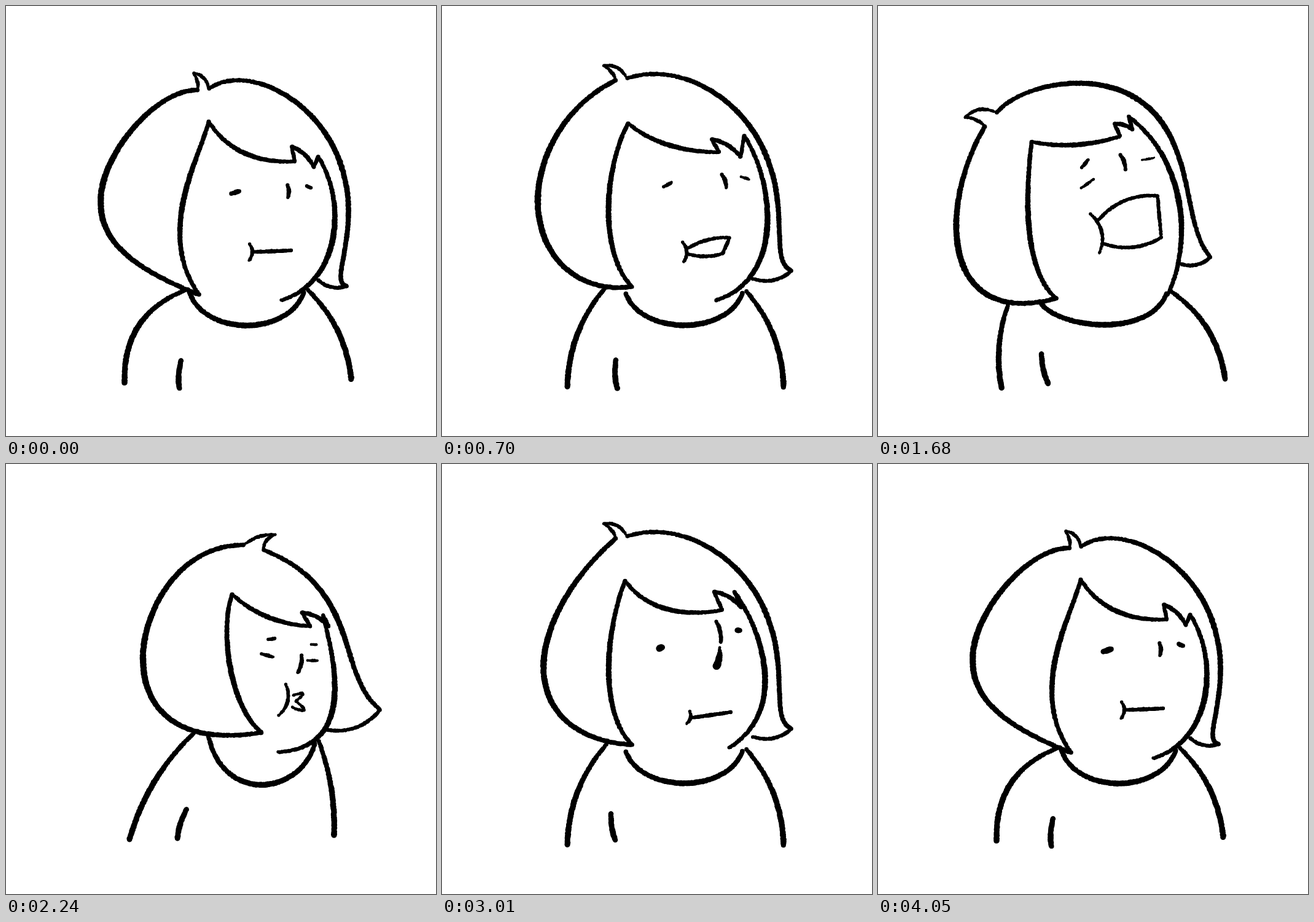
Write an HTML page with a canvas that moves like this. It is 700x700 px and loops after 4150 ms.

```html
<!DOCTYPE html>
<html>
<head>
<meta charset="utf-8">
<style>
html, body { margin: 0; width: 100%; height: 100%; overflow: hidden; background: #fff; }
canvas { display: block; width: 100vmin; height: 100vmin; }
</style>
</head>
<body>
<canvas id="stage" width="700" height="700"></canvas>
<script>
const ctx = document.getElementById('stage').getContext('2d');

// Each pose holds only the key points of the drawing; curves follow from them.
// body: shoulder, both collar ends, both hands, then the bend of each arm.
const calm = {
  tuft: [312,137, 305,109, 330,135],
  back: [216,189, 157,293, 182,391],
  front: [455,145, 545,258, 553,388, 555,456],
  nape: [508,446],
  side: [303,266, 283,365, 314,470],
  bang: [330,188, 387,239, 470,253, 465,229, 501,262, 508,245],
  jaw: [535,332, 517,422, 448,479],
  eyes: [366,306, 380,301, 489,293, 496,296],
  nose: [458,291, 459,312],
  lip: [396,387, 396,414],
  lips: [464,398, 464,398],
  body: [296,461, 298,465, 485,466, 193,614, 562,607, -0.18, 0.09],
  crease: [285,577, 282,622],
  eyeWidth: [8]
};

const talk = {
  tuft: [283,121, 263,97, 301,118],
  back: [193,200, 156,315, 194,420],
  front: [438,138, 527,242, 549,360, 569,431],
  nape: [506,444],
  side: [276,275, 274,375, 309,457],
  bang: [303,191, 368,226, 451,238, 439,217, 486,246, 492,211],
  jaw: [527,308, 518,412, 446,479],
  eyes: [360,295, 374,287, 486,278, 500,282],
  nose: [455,274, 463,296],
  lip: [391,384, 394,416],
  lips: [468,377, 457,403],
  body: [268,456, 299,468, 489,468, 204,620, 556,620, -0.09, 0.09],
  crease: [283,576, 285,622],
  eyeWidth: [6]
};

const grit = {
  tuft: [374,126, 382,96, 397,130],
  back: [260,182, 210,299, 239,418],
  front: [511,179, 574,286, 574,398, 582,472],
  nape: [513,457],
  side: [346,290, 337,390, 348,481],
  bang: [372,211, 427,263, 498,283, 496,263, 522,287, 527,272],
  jaw: [547,372, 500,461, 400,479],
  eyes: [418,311, 437,313, 516,326, 529,329],
  nose: [497,313, 493,333],
  lip: [414,391, 399,414],
  lips: [478,412, 468,420],
  body: [292,461, 304,470, 489,472, 190,618, 557,615, -0.17, 0.15],
  crease: [284,585, 282,618],
  eyeWidth: [6],
  marks: 'teeth fold'
};

const shout = {
  tuft: [174,196, 142,181, 193,174],
  back: [135,294, 131,397, 178,470],
  front: [313,126, 440,165, 500,283, 541,409],
  nape: [493,420],
  side: [244,305, 252,402, 290,476],
  bang: [250,221, 322,226, 394,212, 385,192, 414,201, 408,180],
  jaw: [473,263, 494,367, 472,470],
  eyes: [330,297, 351,282, 429,251, 450,247],
  brows: [331,264, 342,250],
  nose: [394,242, 403,266],
  lip: [345,338, 360,403],
  lips: [455,309, 461,377],
  body: [213,483, 263,481, 470,468, 201,621, 565,607, -0.07, 0.11],
  crease: [266,566, 277,615],
  eyeWidth: [5]
};

const pout = {
  tuft: [387,132, 439,115, 419,140],
  back: [267,193, 223,315, 268,416],
  front: [490,182, 538,249, 566,329, 609,400],
  nape: [523,433],
  side: [360,290, 377,376, 416,437],
  bang: [368,212, 426,249, 495,264, 482,242, 525,264, 516,246],
  jaw: [534,338, 522,426, 443,469],
  eyes: [415,309, 435,314, 490,320, 507,320],
  brows: [426,286, 438,284, 496,294, 506,294],
  nose: [481,311, 475,340],
  lip: [455,358, 444,409],
  kiss: [467,377, 472,386, 466,396],
  body: [309,435, 329,441, 503,455, 201,611, 534,604, -0.07, 0.05],
  crease: [294,562, 279,609],
  eyeWidth: [6]
};

const sniff = {
  ...talk,
  back: [207,208, 166,316, 195,411],
  bang: [298,190, 362,235, 456,238, 443,208, 487,234, 476,208],
  jaw: [517,293, 522,387, 467,462],
  eyes: [353,301, 358,298, 480,271, 485,271],
  nose: [446,256, 454,290],
  lip: [403,402, 398,423],
  lips: [470,404, 470,404],
  crease: [275,569, 282,612],
  eyeWidth: [12],
  marks: 'drip'
};

const still = ['body', 'crease', 'eyeWidth', 'marks'];

// The same pose with the head shifted.
function shift(pose, dx, dy, changes) {
  const moved = {};
  for (const k in pose) {
    moved[k] = still.includes(k) ? pose[k] : pose[k].map((v, i) => v + (i % 2 ? dy : dx));
  }
  return { ...moved, ...changes };
}

// Hair swings outward, more so the lower it hangs.
function spread(pose, amount) {
  const swing = p => p.map((x, i) =>
    i % 2 ? x : x + amount * (x - 300) * (p[i + 1] - 100) / 360);
  return { ...pose, back: swing(pose.back), front: swing(pose.front), eyeWidth: [5] };
}

const flare = spread(shift(calm, 0, -8), 0.36);
const rest = shift(sniff, -3, 2, { marks: '' });
const keys = [
  [0, calm], [420, flare], [490, flare], [700, talk], [1050, shift(talk, -8, -5)],
  [1330, grit], [1680, shout], [1820, shift(shout, -12, 6)], [2240, pout],
  [2590, shift(sniff, -7, -3, { marks: '' })], [3010, sniff], [3150, rest], [3360, rest],
  [3640, calm], [3710, calm], [3850, shift(calm, -1, -1, { eyeWidth: [5] })],
  [4050, { ...calm, eyeWidth: [10] }]
];

const mix = (a, b, u) => a + (b - a) * u;
const rand = n => { const v = Math.sin(n * 12.9898) * 43758.5453; return v - Math.floor(v); };
const pairs = p => Array.from({ length: p.length >> 1 }, (_, i) => p.slice(2 * i, 2 * i + 2));
const dist = (a, b) => Math.hypot(b[0] - a[0], b[1] - a[1]);

// Point on the smooth curve that passes through all given points.
function along(p, u) {
  const n = p.length / 2, s = u * (n - 1), out = [0, 0];
  for (let i = 0; i < n; i++) {
    let weight = 1;
    for (let j = 0; j < n; j++) if (j !== i) weight *= (s - j) / (i - j);
    out[0] += weight * p[2 * i];
    out[1] += weight * p[2 * i + 1];
  }
  return out;
}

// Arc from a to b, pushed sideways by a share of its length.
function bend(a, b, k) {
  const dx = b[0] - a[0], dy = b[1] - a[1];
  return [...a, a[0] + dx / 2 + k * dy, a[1] + dy / 2 - k * dx, ...b];
}

// Brush stroke with tapering ends and an uneven edge.
function ink(p, width, start = 0.7, end = start) {
  let length = 0;
  const pts = pairs(p);
  for (let i = 1; i < pts.length; i++) length += dist(pts[i - 1], pts[i]);
  const steps = Math.ceil(length * 1.1) + 1;
  ctx.beginPath();
  for (let i = 0; i <= steps; i++) {
    const u = i / steps, [x, y] = along(p, u);
    const w = u < 0.5 ? mix(start, 1, 2 * u) : mix(1, end, 2 * u - 1);
    const r = width * w / 2 + 0.9 * (rand(i) - 0.6);
    const cx = x + rand(i + 500) - 0.5, cy = y + rand(i + 900) - 0.5;
    ctx.moveTo(cx + r, cy);
    ctx.arc(cx, cy, r, 0, 7);
  }
  ctx.fill();
}

function drawHair(pose) {
  const [left, tip, right] = pairs(pose.tuft);
  const lean = tip[0] > right[0] ? -1 : 1;
  ink(bend(left, tip, -0.1 * lean), 6);
  ink(bend(tip, right, 0.18 * lean), 6);

  const chin = pose.side.slice(-2);
  ink([...left, ...pose.back, ...chin], 10);
  ink([...right, ...pose.front], 9);
  ink(bend(pose.front.slice(-2), pose.nape, 0.14), 6, 1);

  const [part, mid, end, up, down, edge] = pairs(pose.bang);
  ink([...part, ...pose.side], 9);
  ink([...part, ...mid, ...end], 8);
  ink([...end, ...up], 6, 1);
  ink(bend(up, down, 0.1), 7, 0.9);
  ink([...down, ...edge], 6, 1);
  ink([...edge, ...pose.jaw], 9.5, 0.6);
}

function drawMouth(pose) {
  const [top, bottom] = pairs(pose.lip);
  const lip = bend(top, bottom, 0.18);
  ink(lip, 6, 0.8);
  if (pose.lips) {
    const [upper, lower] = pairs(pose.lips), gap = dist(upper, lower);
    const push = a => 0.2 * gap / dist(a, upper);
    const a = along(lip, 0.5 - gap / 250), b = along(lip, 0.5 + gap / 250);
    const roof = bend(a, upper, push(a)), floor = bend(lower, b, push(b));
    ink(roof, 6, 0.9);
    ink([...upper, ...lower], 6, 0.9);
    ink(floor, 6, 0.9);
    if (pose.marks?.includes('teeth')) {
      for (let u = 0.2; u < 0.9; u += 0.2) {
        ink([...along(floor, 1 - u), ...along(roof, u + 0.1)], 3, 1);
      }
    }
  }
  if (pose.kiss) {
    const [a, b, c] = pairs(pose.kiss);
    ink(bend(a, b, 1.5), 5, 0.9);
    ink(bend(b, c, 1.6), 5, 0.9);
  }
}

function drawFace(pose) {
  const w = pose.eyeWidth[0];
  const dashes = (p, width) => {
    for (let i = 0; i < p.length; i += 4) ink(p.slice(i, i + 4), width * (i ? 0.8 : 1), 0.8);
  };
  dashes(pose.eyes, w);
  if (pose.brows) dashes(pose.brows, 6);
  const [bridge, end] = pairs(pose.nose);
  ink(bend(bridge, end, 0.08), 7, 0.8);
  if (pose.marks?.includes('drip')) {
    const [x, y] = end;
    ink([x - 2, y + 8, x - 3, y + 26, x - 7, y + 39], 11, 0.35, 1.1);
  }
  drawMouth(pose);
}

function drawBody(pose) {
  const [shoulder, left, right, handL, handR, [bendL, bendR]] = pairs(pose.body);
  const x = u => mix(left[0], right[0], u);
  ink([...left, x(0.29), 514, x(0.71), 514, ...right], 9, 0.8);
  ink(bend(shoulder, handL, bendL), 9, 0.7, 1);
  ink(bend([right[0] + 6, right[1] - 4], handR, bendR), 9, 0.7, 1);
  const [top, bottom] = pairs(pose.crease);
  ink(bend(top, bottom, -0.05), 9, 0.9, 1);
  if (pose.marks?.includes('fold')) {
    ink([top[0] - 10, top[1] + 2, top[0], top[1], top[0] + 20, top[1] - 19], 6);
  }
}

function poseAt(t) {
  const i = keys.findIndex(k => k[0] > t) - 1;
  if (i < 0) return keys[keys.length - 1][1];
  const [t0, a] = keys[i], [t1, b] = keys[i + 1];
  const f = (t - t0) / (t1 - t0), u = f * f * (3 - 2 * f);
  const near = u < 0.5 ? a : b, pose = { ...near };
  for (const k in near) {
    if (Array.isArray(near[k]) && a[k]?.length === b[k]?.length) {
      pose[k] = a[k].map((v, j) => mix(v, b[k][j], u));
    }
  }
  return pose;
}

function draw(t) {
  const pose = poseAt(t);
  ctx.fillStyle = '#fff';
  ctx.fillRect(0, 0, 700, 700);
  ctx.fillStyle = '#000';
  drawBody(pose);
  drawHair(pose);
  drawFace(pose);
}

let shown = -1;
function tick() {
  const t = performance.now() % 4150;
  const step = t < 3850 ? Math.floor(t / 70) * 70 : 3850 + Math.floor((t - 3850) / 100) * 100;
  if (step !== shown) draw(shown = step);
  requestAnimationFrame(tick);
}
tick();
</script>
</body>
</html>
```
